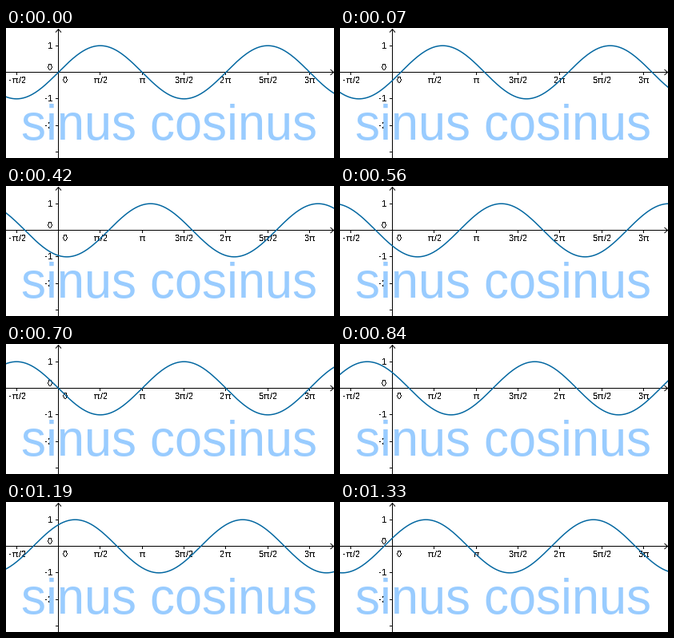
These frames come from a looping animation (410 by 163 pixels, 1400 ms). A matplotlib script:

```python
import numpy as np
import matplotlib.pyplot as plt
from matplotlib.animation import FuncAnimation

W, H, DPI = 410, 163, 64
FRAMES, INTERVAL = 20, 70
X0, Y0 = 65.5, 55.5      # origin, pixel centre
UNIT = 33.33             # pixels per unit on both axes
PT = 72 / DPI            # points per pixel

plt.rcParams.update({"font.family": "Liberation Sans",
                     "text.hinting": "native",
                     "text.hinting_factor": 1})
fig = plt.figure(figsize=(W / DPI, H / DPI), dpi=DPI, facecolor="white")
ax = fig.add_axes([0, 0, 1, 1])
ax.set_xlim(0, W)
ax.set_ylim(H, 0)
ax.axis("off")


def stroke(xs, ys, color="black", width=1.0, z=2):
    # coordinates are already pixel centres, so snapping would shift them
    return ax.plot(xs, ys, color=color, lw=width * PT, zorder=z,
                   solid_capstyle="butt", snap=False)[0]


def label(x, y, text, ha="center"):
    ax.text(x, y, text, fontsize=11 * PT, ha=ha, va="baseline",
            zorder=3, antialiased=False)


# axes with open arrowheads
stroke([0, W], [Y0, Y0])
stroke([X0, X0], [1, H])
stroke([W - 4.5, W - 0.5, W - 4.5], [Y0 - 3.5, Y0, Y0 + 3.5])
stroke([X0 - 3.5, X0, X0 + 3.5], [5.5, 1.5, 5.5])

# horizontal scale in steps of pi/2
names = ["-π/2", "", "π/2", "π", "3π/2", "2π", "5π/2", "3π"]
for k, name in enumerate(names, start=-1):
    if k == 0:
        continue
    x = np.floor(X0 + k * np.pi / 2 * UNIT) + 0.5
    stroke([x, x], [Y0, Y0 + 3.5])
    label(x + 0.5, 69, name)
label(74, 69, "0")

# vertical scale
for k in (1, -1, -2, -3):
    y = np.floor(Y0 - k * UNIT) + 0.5
    stroke([X0 - 3.5, X0], [y, y])
    if k > -3:
        label(58, y + 3.5, str(k), ha="right")
label(58, 53, "0", ha="right")

ax.text(19, 140, "sinus cosinus", fontsize=61.7 * PT, color="#99ccff",
        va="baseline", zorder=5)

xs = np.linspace(-2, W + 2, 830)
wave = stroke(xs, xs, color="#0066a0", width=1.5, z=4)


def draw(i):
    phase = 2 * np.pi * i / FRAMES
    wave.set_ydata(Y0 - UNIT * np.sin((xs - X0) / UNIT - phase))
    return [wave]


anim = FuncAnimation(fig, draw, frames=FRAMES, interval=INTERVAL,
                     repeat=True, repeat_delay=0)
plt.show()
```
